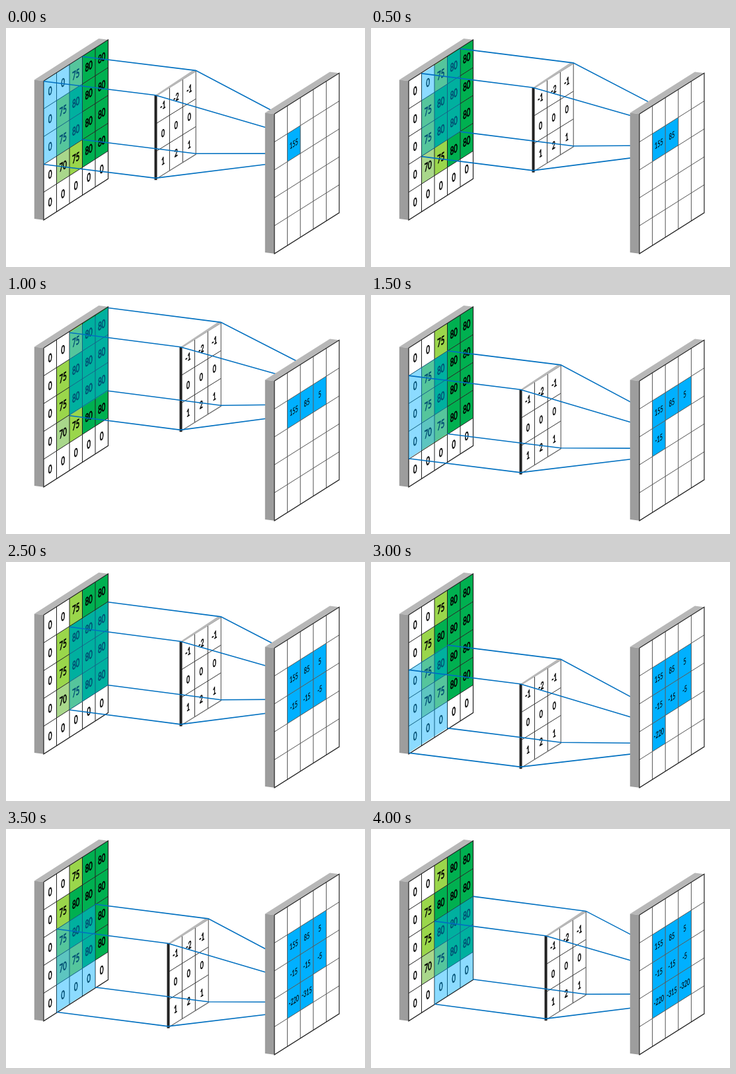
An HTML page with a canvas that plays this animation: 543 px wide and 362 px high, repeating every 4500 ms.

```html
<!DOCTYPE html>
<html lang="en">
<head>
<meta charset="utf-8">
<title>Convolution step by step</title>
<style>
  html, body { margin: 0; width: 100%; height: 100%; overflow: hidden; background: #fff; }
  canvas { display: block; width: 543px; height: 362px; }
</style>
</head>
<body>
<canvas id="stage" width="543" height="362"></canvas>
<script>
const ctx = document.getElementById('stage').getContext('2d');
const STEP_MS = 500;
const BLUE = '#00b0ff';
const fills = { 0: '#fff', 70: '#a9d78b', 75: '#9ad64b', 80: '#00b050' };
const input = [
  [0, 0, 75, 80, 80],
  [0, 75, 80, 80, 80],
  [0, 75, 80, 80, 80],
  [0, 70, 75, 80, 80],
  [0, 0, 0, 0, 0]
];
const kernel = [[-1, -2, -1], [0, 0, 0], [1, 2, 1]];
const results = [155, 85, 5, -15, -15, -5, -220, -315, -320];

// A plane maps (column, row) to stage coordinates.
const plane = (x, y, dx, dy, rowHeight) =>
  (col, row) => [x + col * dx, y + col * dy + row * rowHeight];
const inputPlane = plane(57, 80.3, 19.5, -12.5, 42.1);
const outputPlane = plane(406, 130.3, 19.6, -12.4, 42.3);

function trace(points) {
  ctx.beginPath();
  points.forEach(p => ctx.lineTo(...p));
}

function polygon(points, color) {
  trace(points);
  ctx.closePath();
  ctx.fillStyle = color;
  ctx.fill();
}

function line(points, color, width = 1) {
  trace(points);
  ctx.strokeStyle = color;
  ctx.lineWidth = width;
  ctx.stroke();
}

const corners = (at, col, row, size) =>
  [at(col, row), at(col + size, row), at(col + size, row + size), at(col, row + size)];

function grid(at, size, color, edge) {
  for (let i = 1; i < size; i++) {
    line([at(i, 0), at(i, size)], color);
    line([at(0, i), at(size, i)], color);
  }
  const [tl, tr, br, bl] = corners(at, 0, 0, size);
  line([tl, tr, br, bl, tl], edge, 1.2);
}

function label(at, col, row, text, size, bold) {
  const [x, y] = at(col + 0.5, row + 0.5);
  ctx.save();
  ctx.transform(0.56, -0.35, 0, 1, x, y + size * 0.36);
  ctx.font = `${size}px Lato, Carlito, sans-serif`;
  ctx.textAlign = 'center';
  ctx.fillStyle = ctx.strokeStyle = '#000';
  ctx.lineWidth = bold;
  ctx.fillText(text, 0, 0);
  ctx.strokeText(text, 0, 0);
  ctx.restore();
}

function slab(at) {
  const [tl, tr, , bl] = corners(at, 0, 0, 5);
  const back = ([x, y]) => [x - 14.2, y - 1.7];
  polygon([tl, tr, back(tr), back(tl)], '#b8b8b8');
  polygon([tl, bl, back(bl), back(tl)], '#9d9d9d');
  polygon(corners(at, 0, 0, 5), '#fff');
}

function drawInput(col, row) {
  slab(inputPlane);
  input.forEach((values, r) => values.forEach((v, c) =>
    polygon(corners(inputPlane, c, r, 1), fills[v])));
  grid(inputPlane, 5, '#222', '#222');
  input.forEach((values, r) => values.forEach((v, c) =>
    label(inputPlane, c, r, v, 16.8, 0.9)));
}

function drawKernel(x, y) {
  const at = plane(x + 1.5, y + 0.8, 19.9, -12.4, 42);
  polygon(corners(at, 0, 0, 3), '#fff');
  grid(at, 3, '#333', '#666');
  polygon([[x, y], [x + 57, y - 38], [x + 61, y - 36], [x + 3, y + 1]], '#b8b8b8');
  line([[x + 0.5, y], [x + 0.5, y + 128.5]], '#222', 4);
  kernel.forEach((values, r) => values.forEach((v, c) =>
    label(at, c, r, v, 15.3, 0.8)));
}

function drawOutput(step) {
  slab(outputPlane);
  const shown = results.slice(0, step + 1);
  const place = i => [1 + i % 3, 1 + Math.floor(i / 3)];
  shown.forEach((v, i) => polygon(corners(outputPlane, ...place(i), 1), BLUE));
  grid(outputPlane, 5, '#555', '#222');
  shown.forEach((v, i) => label(outputPlane, ...place(i), v, 13, 0.15));
}

function draw(step) {
  const col = step % 3, row = Math.floor(step / 3);
  const x = 226 + col * 19, y = 101.7 + row * 41.5 - col * 11.5;
  ctx.fillStyle = '#fff';
  ctx.fillRect(0, 0, 543, 362);
  drawInput(col, row);

  const windowPlane = plane(57 + col * 19.5, 80.8 + row * 41.3 - col * 11.9, 19.5, -12.5, 41.9);
  const from = corners(windowPlane, 0, 0, 3);
  ctx.globalAlpha = 0.45;
  polygon(from, BLUE);
  ctx.globalAlpha = 1;
  drawKernel(x, y);

  const through = [[x, y], [x + 61, y - 37.3], [x + 61, y + 88.5], [x, y + 125.7]];
  const to = corners(outputPlane, col + 1, row + 1, 1);
  from.forEach((p, i) => line([p, through[i], to[i]], '#0070c0', 1.6));

  drawOutput(step);
}

function tick() {
  draw(Math.floor(performance.now() / STEP_MS) % results.length);
  requestAnimationFrame(tick);
}
tick();
</script>
</body>
</html>
```
